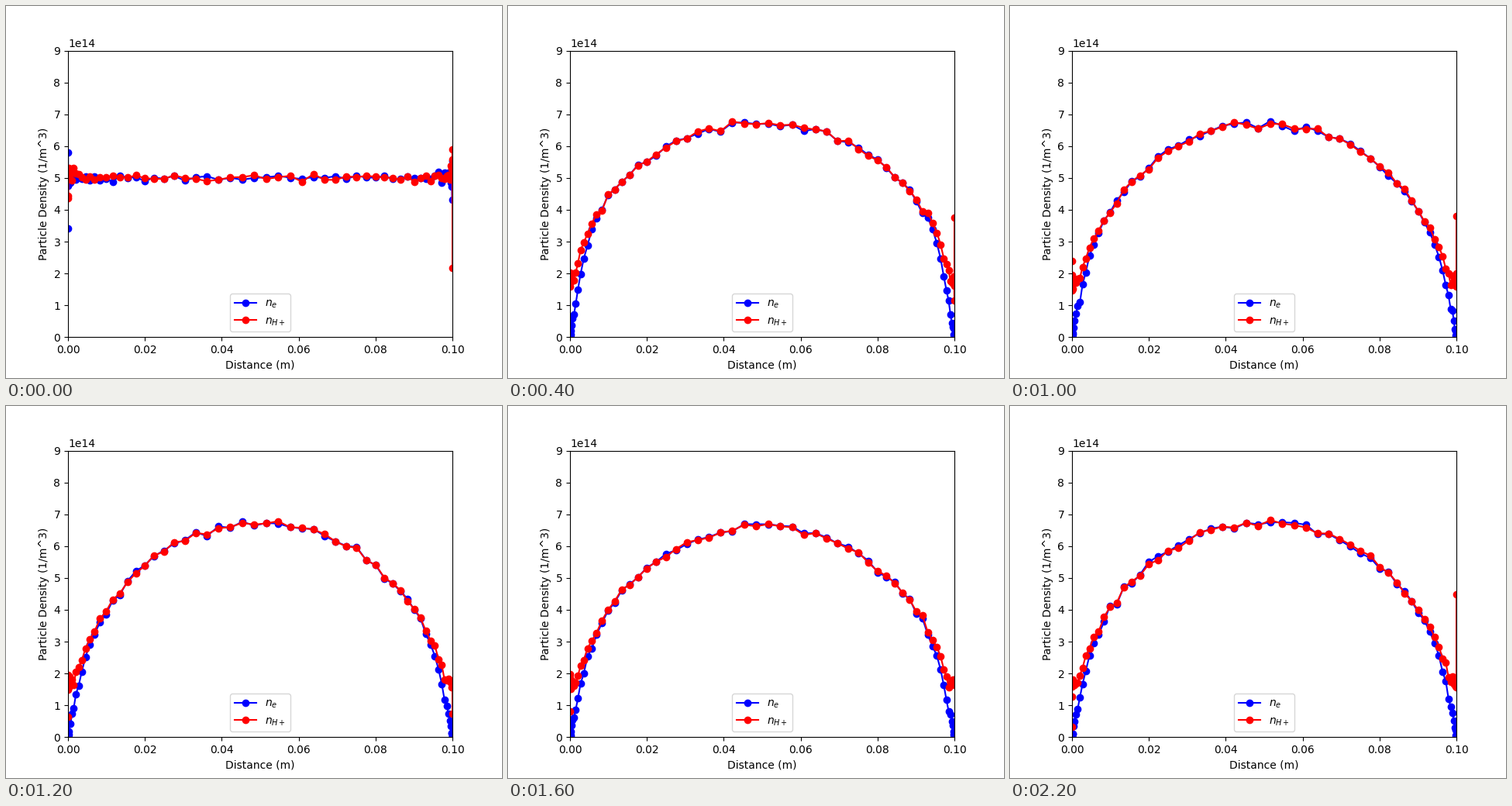
A matplotlib script that plays this animation: 640 px wide and 480 px high, repeating every 2.3 s.

```python
import numpy as np
import matplotlib.pyplot as plt
from matplotlib.animation import FuncAnimation

FRAMES = 23
CELLS = 64
LENGTH = 0.1
UNIT = 1e14
WALL_IONS = 1.7
SHEATH = 0.02

# Cell centres, crowded towards both walls
phase = (np.arange(CELLS) + 0.5) / CELLS
u = phase - np.sin(2 * np.pi * phase) / (2 * np.pi)
width = 1 - np.cos(2 * np.pi * phase)
arch = 4 * u * (1 - u)
depth = np.minimum(u, 1 - u)


def peak_density(frame):
    return np.interp(frame, [0, 4, 6, 10, 14, 19, 22],
                     [5, 6.7, 6.35, 6.7, 6.75, 6.48, 6.75])


def densities(frame):
    # A flat start relaxes into an elliptic profile; electrons drain at the walls
    settled = np.tanh(frame / 3.3)
    ions = np.maximum(peak_density(frame) * arch ** (settled / 2), WALL_IONS)
    electrons = ions * (1 - np.exp(-depth / SHEATH)) ** min(frame / 3, 1)

    # Smaller cells hold fewer particles and so fluctuate more
    rng = np.random.default_rng(100 + frame)
    shared, *own = rng.normal(size=(3, CELLS))
    common, apart = (0.9, 0.5) if frame else (0, 1)

    def noisy(density, noise):
        shot = 0.0224 * np.sqrt(density * 2 / width)
        return UNIT * np.clip(density + shot * (common * shared + apart * noise), 0, 8.4)

    return noisy(electrons, own[0]), noisy(ions, own[1])


fig, ax = plt.subplots(figsize=(6.4, 4.8), dpi=100)
lines = [ax.plot([], [], "-o", color=color, label=label)[0]
         for color, label in [("blue", "$n_e$"), ("red", "$n_{H+}$")]]
ax.set_xlim(0, LENGTH)
ax.set_ylim(0, 9 * UNIT)
ax.set_xlabel("Distance (m)")
ax.set_ylabel("Particle Density (1/m^3)")
ax.legend(loc="lower center")


def update(frame):
    for line, density in zip(lines, densities(frame)):
        line.set_data(u * LENGTH, density)
    return lines


anim = FuncAnimation(fig, update, frames=FRAMES, interval=100, repeat=True)
plt.show()
```
